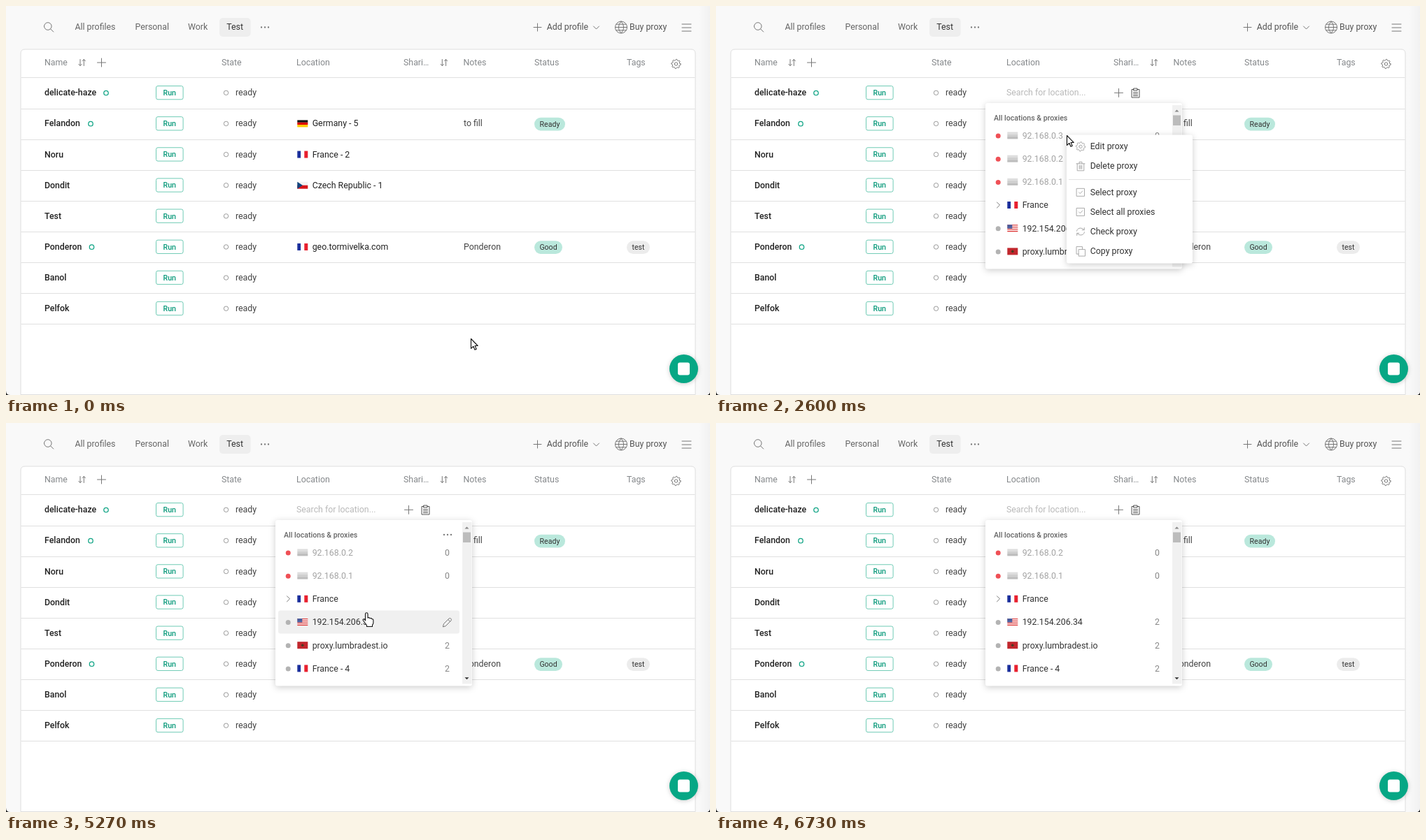
These frames come from a looping animation (1006 by 557 pixels, 7340 ms). An HTML page:

```html
<!DOCTYPE html>
<html lang="en">
<head>
<title>Profile manager</title>
<style>
  html, body { margin: 0; width: 100%; height: 100%; overflow: hidden; background: #222; }
  svg { display: block; width: 1006px; height: 557px; font: 12.35px Roboto, sans-serif; fill: #333; }
  .line { fill: none; stroke: #777; stroke-width: 1; stroke-linecap: round; stroke-linejoin: round; }
  .light { stroke: #aaa; }
  .dark { stroke: #555; }
  .small { font-size: 10.58px; }
  .medium { font-weight: 500; }
  .name { font-weight: 500; fill: #222; }
  .muted { fill: #85888b; }
  .faint { fill: #b9b9b9; }
  .dead { fill: #a3a3a3; }
  .green { fill: #0a9a7b; }
  .panel { fill: #fff; filter: drop-shadow(0 2px 5px #0003); }
  .cursor { fill: #fff; stroke: #111; stroke-width: 1.1; stroke-linejoin: round; }
</style>
</head>
<body>
<svg id="stage" viewBox="0 0 1006 557"></svg>
<script>
const LOOP = 7340, TICK = 1000 / 15;
// Ticks at which the interface changes
const OPEN_LIST = 23, CARET_OFF = 31, OPEN_MENU = 39, OPEN_DIALOG = 55, DELETED = 79, EXIT = 101;

const rows = [
  { name: 'delicate-haze', ring: 143 },
  { name: 'Felandon', ring: 121, flag: 'de', place: 'Germany - 5', end: 504, note: 'to fill', status: 'Ready', pill: 44 },
  { name: 'Noru', flag: 'fr', place: 'France - 2', end: 492 },
  { name: 'Dondit', flag: 'cz', place: 'Czech Republic - 1', end: 538 },
  { name: 'Test' },
  { name: 'Ponderon', ring: 122.5, flag: 'fr', place: 'geo.tormivelka.com', end: 547, note: 'Ponderon', status: 'Good', pill: 40, tag: 'test' },
  { name: 'Banol' },
  { name: 'Pelfok' }
];
const proxies = [
  { label: '92.168.0.3', flag: 'none', count: 0 },
  { label: '92.168.0.2', flag: 'none', count: 0 },
  { label: '92.168.0.1', flag: 'none', count: 0 },
  { label: 'France', flag: 'fr', group: true },
  { label: '192.154.206.34', flag: 'us', count: 2 },
  { label: 'proxy.lumbradest.io', flag: 'ma', count: 2 },
  { label: 'France - 4', flag: 'fr', count: 2 }
];
const moves = [
  { from: 6, to: 18, a: [664, 476], c: [528, 363], b: [458.5, 124] },
  { from: 26, to: 34, a: [458.5, 124], b: [501, 185] },
  { from: 44, to: 50, a: [501, 185], b: [549.5, 223.5] },
  { from: 60, to: 68, a: [549.5, 223.5], b: [515.5, 271.5] },
  { from: 91, to: EXIT, a: [515.5, 271.5], b: [68, 557] }
];

const text = (x, y, s, cls = '', extra = '') => `<text x="${x}" y="${y}" dy=".35em" class="${cls}" ${extra}>${s}</text>`;
const rect = (x, y, w, h, fill, r = 0, extra = '') => `<rect x="${x}" y="${y}" width="${w}" height="${h}" rx="${r}" fill="${fill}" ${extra}/>`;
const disc = (x, y, r, fill, stroke = 'none', w = 1) => `<circle cx="${x}" cy="${y}" r="${r}" fill="${fill}" stroke="${stroke}" stroke-width="${w}"/>`;
const icon = (x, y, d, cls = '') => `<path transform="translate(${x} ${y})" class="line ${cls}" d="${d}"/>`;
const dots = (x, y) => [-5, 0, 5].map(d => disc(x + d, y, 1.15, '#777')).join('');

const PLUS = 'M-6,0H6M0,-6V6';
const SORT = 'M-2.5,-4.5V4.5M-4.7,2.3L-2.5,4.5L-.3,2.3M2.8,4.5V-4.5M.6,-2.3L2.8,-4.5L5,-2.3';
const CLIPBOARD = 'M-2.5,-5H-5.5V6.5H5.5V-5H2.5M-2.5,-6.5H2.5V-3.5H-2.5ZM-3,-.7H3M-3,1.6H3M-3,4H3';
const PENCIL = 'M-6,6L-5,2L2.7,-5.6Q4,-6.6 5.3,-5.3T5.6,-2.7L-2,5ZM1.2,-4L4,-1.2';
const TRASH = 'M-6,-3.5H6M-2,-3.5V-6H2V-3.5M-4.8,-3.5V6.5H4.8V-3.5M-1.8,-1V4M0,-1V4M1.8,-1V4';
const TICKBOX = 'M-5.5,-5.5H5.5V5.5H-5.5ZM-2.5,0L-.7,1.8L2.7,-1.8';
const REFRESH = 'M-5.5,-.8Q-4.5,-5 0,-5Q3,-5 5,-2.5M5.3,-5.5V-2.3H2.2M5.5,.8Q4.5,5 0,5Q-3,5 -5,2.5M-5.3,5.5V2.3H-2.2';
const COPY = 'M-2.5,-2.5H6.5V7H-2.5ZM-2.5,4H-6V-6.5H2.5V-2.5';
const GLOBE = 'M-8.5,0A8.5,8.5 0 1 1 8.5,0A8.5,8.5 0 1 1 -8.5,0H8.5M0,-8.5Q-7.5,0 0,8.5Q7.5,0 0,-8.5M-7.2,-4.3H7.2M-7.2,4.3H7.2';
const ARROW = 'M.5,.5V14.4L3.8,11.3L6,16.2L8.2,15.2L6.1,10.5H10.2Z';
const HAND = 'M-2,11.5V2a1.75,1.75 0 0 1 3.5,0V7.5q2.5,-1 3,.8q2.4,-.9 2.8,1q2,-.4 2.1,1.6V14.5q0,2 -1.4,3.2V20H0V18Q-2,15.5 -5,11.5q-1,-1.8 .4,-2.2q1.2,-.3 2.6,2.2Z';
const GEAR = Array.from({ length: 32 }, (_, i) => {
  const r = i % 4 < 2 ? 6.7 : 5.2, a = i * Math.PI / 16;
  return `${i ? 'L' : 'M'}${(r * Math.cos(a)).toFixed(2)},${(r * Math.sin(a)).toFixed(2)}`;
}).join('') + 'ZM-2.2,0A2.2,2.2 0 1 1 2.2,0A2.2,2.2 0 1 1 -2.2,0';

const bands = colors => colors.map((c, i) => rect(0, i * 10 / colors.length, 15, 10 / colors.length, c)).join('');
const flags = {
  de: bands(['#111', '#d00', '#fc0']),
  fr: ['#1b2f9c', '#fff', '#e8202e'].map((c, i) => rect(i * 5, 0, 5, 10, c)).join(''),
  cz: bands(['#f3f3f3', '#d7141a']) + '<path d="M0,0L7.5,5L0,10Z" fill="#11457e"/>',
  us: bands(['#d33', '#fff', '#d33', '#fff', '#d33', '#fff', '#d33']) + rect(0, 0, 7, 5.4, '#4a5c9c'),
  ma: rect(0, 0, 15, 10, '#c1272d') + disc(7.5, 5, 1.8, '#4a3a20'),
  none: bands(['#dedede', '#cfcfcf', '#bdbdbd'])
};
const flag = (kind, y) => `<g transform="translate(416.3 ${y - 5})">${flags[kind]}</g>`;

function pointerAt(k) {
  const m = moves.findLast(m => k >= m.from) || moves[0];
  const u = Math.min(1, Math.max(0, (k - m.from) / (m.to - m.from)));
  const p = u < .5 ? 4 * u ** 3 : 1 - 4 * (1 - u) ** 3;
  const c = m.c || m.a.map((v, i) => (v + m.b[i]) / 2);
  return m.a.map((v, i) => (1 - p) ** 2 * v + 2 * p * (1 - p) * c[i] + p * p * m.b[i]);
}

function topBar() {
  return '<path d="M0,0H1006V551Q1006,557 1000,557H6Q0,557 0,551Z" fill="#f9f9f9"/>'
    + '<path d="M990,0H1006V551Q1006,557 1000,557H990Z" fill="url(#edge)"/>'
    + icon(60, 29.5, 'M-5.5,-.5A5.3,5.3 0 1 1 5.1,-.5A5.3,5.3 0 1 1 -5.5,-.5M3.6,3.3L7.8,7.5')
    + rect(305, 17, 44.5, 27, '#eee', 5)
    + text(98.5, 30, 'All profiles', '', 'fill="#666"') + text(184.5, 30, 'Personal', '', 'fill="#666"')
    + text(260, 30, 'Work', '', 'fill="#666"') + text(315.3, 30, 'Test') + dots(370, 30.5)
    + icon(759.5, 30.5, 'M-5.5,0H5.5M0,-5.5V5.5') + text(772.7, 30, 'Add profile', '', 'fill="#555"')
    + icon(843.5, 31, 'M-4,-2L0,2L4,-2') + icon(879, 30.5, GLOBE)
    + text(891, 30, 'Buy proxy', '', 'fill="#555"') + icon(972.5, 31, 'M-6.5,-5H6.5M-6.5,0H6.5M-6.5,5H6.5');
}

function tableHead() {
  const labels = [[55, 'Name'], [308, 'State'], [415, 'Location'], [568, 'Shari&hellip;'], [653.5, 'Notes'], [755, 'Status'], [887, 'Tags']];
  return '<path d="M21,556.5V68Q21,62 27,62H979Q985,62 985,68V556.5Z" fill="#fff" stroke="#dedede"/>'
    + labels.map(([x, s]) => text(x, 81, s, 'muted')).join('')
    + icon(108.5, 81, SORT) + icon(136.5, 81, PLUS) + icon(625.8, 81, SORT) + icon(957.5, 83, GEAR);
}

function tableRow(row, i, hovered, editing) {
  const top = 102.4 + 44.13 * i, y = top + 21.6;
  let s = hovered ? rect(21.5, top, 963, 44, '#f7f7f7') : '';
  s += `<path d="M21.5,${Math.round(top) + .5}H984.5M21.5,${Math.round(top + 44.13) + .5}H984.5" stroke="#e0e0e0"/>`;
  s += text(55, y, row.name, 'name');
  if (row.ring) s += disc(row.ring, y + .5, 3.2, '#fff', '#12a586', 1.3);
  s += rect(214.5, y - 9.5, 38.6, 19.3, '#fff', 2.5, 'stroke="#6fcbb5"') + text(233.8, y + .3, 'Run', 'small medium green', 'text-anchor="middle"');
  s += disc(314.5, y + .3, 3.2, 'none', '#999') + text(328, y, 'ready', '', 'fill="#444"');
  if (row.place) s += flag(row.flag, y + .3) + text(437.7, y, row.place, '', 'fill="#222"');
  if (row.note) s += text(654, y, row.note, '', 'fill="#444"');
  if (row.status) s += rect(755, y - 8.5, row.pill, 18.8, '#bae8dc', 9.4) + text(755 + row.pill / 2, y + 1, row.status, 'small', 'text-anchor="middle"');
  if (row.tag) s += rect(887, y - 8.5, 33, 18.8, '#ececec', 9.4) + text(903.5, y + 1, row.tag, 'small', 'text-anchor="middle"');
  if (hovered) {
    s += rect(32.5, y - 5.5, 11.5, 11.5, '#fff', 2, 'stroke="#d2d2d2"') + dots(273.7, y + .5);
    if (row.place) s += disc(403.2, y + .3, 3.5, '#0aa583');
  }
  if (hovered || editing) {
    const x = row.place ? row.end + 16.3 : 575.5;
    if (!row.place) s += text(415, y, 'Search for location...', 'faint');
    s += icon(x, y + .3, PLUS) + icon(x + 24, y + .5, CLIPBOARD, 'dark');
  }
  return s;
}

const dropdown = () => rect(385, 139, 281, 237.5, '#fff', 3, 'class="panel"');

function proxyList(items, hover, inside) {
  let s = dropdown() + text(397, 160, 'All locations &amp; proxies', 'small medium', 'fill="#666"');
  if (inside) s += dots(631, 160);
  items.slice(0, 6).forEach((item, i) => {
    const y = 185.4 + 33.2 * i, active = i === hover, dead = item.count === 0;
    if (active) s += rect(389, y - 16.4, 259, 32.8, '#f0f0f0', 3);
    s += item.group ? icon(403.5, y, 'M-2,-4L2,0L-2,4') : disc(403.2, y + .6, 3.5, dead ? '#ef5056' : '#b3b3b3');
    s += flag(item.flag, y) + text(437.7, y, item.label, dead && !active ? 'dead' : '');
    if (active && !item.group) s += icon(630.5, y + .5, PENCIL);
    else if (!item.group) s += text(634, y, item.count, '', 'text-anchor="end" fill="#888"');
  });
  return s + rect(652, 142, 13.5, 231.5, '#f1f1f1') + rect(653, 156.5, 11, 14.5, '#bcbcbc')
    + '<path d="M655.5,151.5h6l-3,-3z" fill="#888"/><path d="M655.5,364.3h6l-3,3z" fill="#333"/>';
}

function contextMenu(pointerY) {
  const items = [[201, 'Edit proxy', GEAR], [229, 'Delete proxy', TRASH], [266.5, 'Select proxy', TICKBOX],
    [294.6, 'Select all proxies', TICKBOX], [322.7, 'Check proxy', REFRESH], [350.8, 'Copy proxy', COPY]];
  return rect(501, 184.5, 180, 184, '#fff', 3, 'class="panel"') + '<path d="M504,248.5H678" stroke="#e2e2e2"/>'
    + items.map(([y, label, d]) => (Math.abs(pointerY - y) < 14 ? rect(504, y - 14, 174, 28, '#f0f0f0', 3) : '')
      + icon(521, y + .3, d, 'light') + text(534.7, y, label)).join('');
}

function dialog(onDelete) {
  const tone = onDelete ? '#333' : '#777';
  return dropdown() + text(525.5, 238.3, 'Delete 1 proxy permanently?', '', 'text-anchor="middle"')
    + rect(478.5, 261.5, 54.5, 23.3, '#fff', 11.6, `stroke="${onDelete ? '#777' : '#b5b5b5'}"`)
    + text(505.7, 273.3, 'Delete', '', `text-anchor="middle" fill="${tone}"`) + text(546.7, 273.3, 'Back', '', 'fill="#c8c8c8"');
}

const chatButton = () => `<g style="filter:drop-shadow(0 1px 3px #0003)">${disc(968.5, 519.5, 20.5, '#06a785')}</g>`
  + rect(960, 510.5, 17, 18, '#fff', 3);

function scene(k) {
  const [x, y] = pointerAt(k);
  const listOpen = k >= OPEN_LIST, menuOpen = k >= OPEN_MENU && k < OPEN_DIALOG, asking = k >= OPEN_DIALOG && k < DELETED;
  const inside = listOpen && !menuOpen && k < EXIT && x > 385 && x < 666 && y > 139 && y < 376;
  const item = inside && !asking && x > 389 && x < 648 ? Math.floor((y - 169) / 33.2) : -1;
  const hoverRow = k > 6 && k < OPEN_MENU && !inside ? Math.floor((y - 102.4) / 44.13) : -1;
  const onDelete = asking && x > 478 && x < 533 && y > 261 && y < 285;
  const onPlace = hoverRow >= 0 && hoverRow < rows.length && x > 385 && x < 560;

  let s = topBar() + tableHead() + rows.map((row, i) => tableRow(row, i, i === hoverRow, listOpen && i === 0)).join('');
  if (k >= OPEN_LIST && k < CARET_OFF) s += rect(415, 117, 1, 14, '#111');
  if (asking) s += dialog(onDelete);
  else if (listOpen) s += proxyList(k < DELETED ? proxies : proxies.slice(1), item, inside);
  if (menuOpen) s += contextMenu(k > 44 ? y : 0);
  s += chatButton();
  if (k < EXIT) s += `<path class="cursor" transform="translate(${x} ${y})" d="${item >= 0 || onDelete || onPlace ? HAND : ARROW}"/>`;
  return '<defs><linearGradient id="edge"><stop stop-color="#f9f9f9"/><stop offset="1" stop-color="#f1f1f1"/></linearGradient></defs>' + s;
}

const stage = document.getElementById('stage'), start = performance.now();
let shown = -1;
function draw() {
  const k = Math.floor(((performance.now() - start) % LOOP + 4) / TICK);
  if (k !== shown) stage.innerHTML = scene(shown = k);
  requestAnimationFrame(draw);
}
draw();
</script>
</body>
</html>
```
